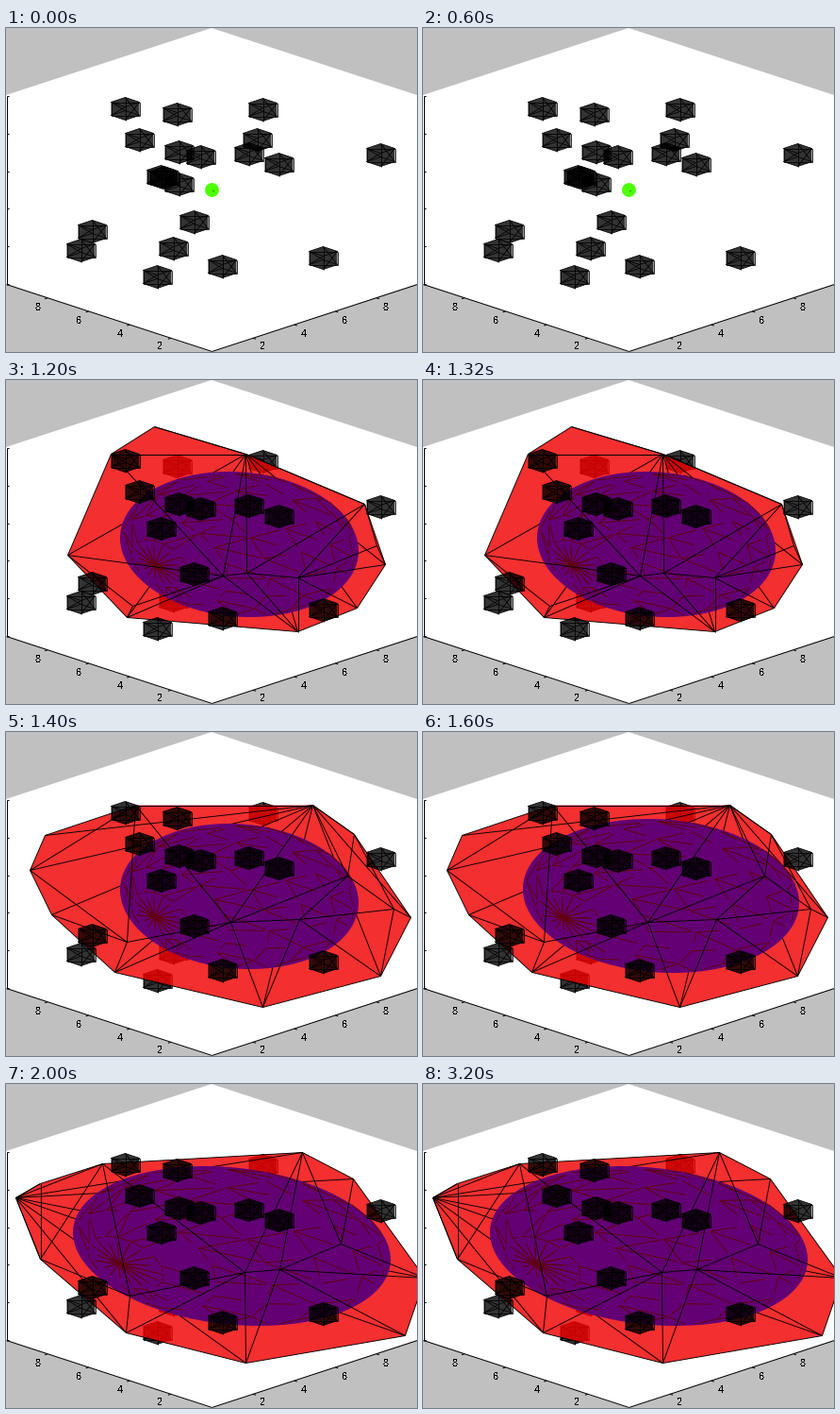
A matplotlib script for the animation above (4000 ms loop, 436 by 343 pixels).

```python
import numpy as np
import matplotlib.pyplot as plt
from matplotlib.animation import FuncAnimation
from matplotlib.collections import LineCollection
from matplotlib.patches import Circle, Polygon
from matplotlib.tri import Triangulation

W, H, DPI = 436, 343, 100
STEP, LOOP = 200, 4000
PX = 72 / DPI

plt.rcParams.update({
    "font.family": "Liberation Sans",
    "text.antialiased": False,
    "text.hinting": "native",
    "text.hinting_factor": 1,
})


def rgb(r, g, b):
    return r / 255, g / 255, b / 255


GREY = rgb(192, 192, 192)
RED = rgb(241, 0, 0)
PURPLE = rgb(99, 0, 116)
MAROON = rgb(98, 0, 18)
GREEN = rgb(76, 255, 0)
OLIVE = rgb(120, 112, 0)

fig = plt.figure(figsize=(W / DPI, H / DPI), dpi=DPI, facecolor=GREY)
ax = fig.add_axes([0, 0, 1, 1])
ax.set(xlim=(0, W), ylim=(H, 0))
ax.axis("off")


def shape(pts, color, z, alpha=1):
    return ax.add_patch(Polygon(pts, fc=color, ec="none", lw=0, alpha=alpha,
                                zorder=z))


def lines(segs, z, color="black", width=0.9):
    segs = np.asarray(segs, float) + 0.5
    return ax.add_collection(LineCollection(
        segs, colors=[color], linewidths=width * PX, zorder=z))


def show(parts, on):
    for part in parts:
        part.set_visible(on)


def draw_room():
    mid = W / 2
    shape([(0, 71), (mid, 0), (W, 71), (W, 271), (mid, H), (0, 271)],
          "white", 0)
    segs = [[(0, 271), (218, 342)], [(218, 342), (436, 271)],
            [(0, 71), (0, 271)]]
    segs += [[(0, y), (2, y)] for y in np.linspace(71, 270, 6).round()]
    for n in range(2, 10, 2):
        dx, y = 21.8 * n, 342 - 7.1 * n
        for side in (-1, 1):
            x = mid + side * dx
            segs.append([(x, y), (x + 3 * side, y + 1)])
            ax.text(mid + side * (10.8 + 21.7 * n), 350 - 6.85 * n, str(n),
                    size=11 * PX, ha="center", va="center_baseline", zorder=1)
    lines(segs, 1, width=1)


class Cube:
    """Translucent triangulated box; `under` lists the hulls covering it."""

    def __init__(self, x, y, under):
        lower = np.array([(0, 12), (15, 7), (0, 2), (-15, 7)])
        upper = lower - (0, 14)
        segs = []
        for i in range(4):
            j = (i + 1) % 4
            segs += [(lower[i], lower[j]), (upper[i], upper[j]),
                     (lower[i], upper[i]), (lower[i], upper[j])]
        segs += [(face[1], face[3]) for face in (lower, upper)]
        rim = [*lower[[3, 0, 1]], *upper[1:]]
        self.under = under
        self.parts = [shape(np.add(rim, (x + 0.5, y + 0.5)), "black", 2, 0.8),
                      lines(np.add(segs, (x, y)), 2, width=0.8)]

    def place(self, hull):
        for part in self.parts:
            part.set_zorder(2 if hull in self.under else 7)


def hull(rim, inner, hub):
    """Solid seen from the front: mesh before, fan of edges from hub behind."""
    rim = np.array(rim)
    pts = np.vstack([rim, inner])
    # a squeezed x axis favours the long, flat facets
    mesh = pts[Triangulation(0.6 * pts[:, 0], pts[:, 1]).edges]
    fan = [(rim[hub], p) for p in rim]
    return [shape(rim + 0.5, RED, 3, 0.815), lines(fan, 4), lines(mesh, 6)]


def sphere_mesh(rng, rings=9, spokes=18):
    """Broken edges on the near half of a unit sphere with a tilted pole."""
    pole = np.array([-0.71, 0.35, 0.61])
    u = np.cross(pole, [0, 1, 0])
    u /= np.linalg.norm(u)
    v = np.cross(pole, u)

    def node(i, j):
        a, b = np.pi * i / rings, 2 * np.pi * j / spokes
        return np.cos(a) * pole + np.sin(a) * (np.cos(b) * u + np.sin(b) * v)

    segs = []
    for i in range(rings):
        for j in range(spokes):
            p = node(i, j)
            for q in (node(i + 1, j), node(i, j + 1), node(i + 1, j + 1)):
                keep, part = rng.random() < 0.75, rng.uniform(0.5, 1)
                if (keep or i == 0) and min(p[2], q[2]) > 0:
                    segs.append((p, p + part * (q - p)))
    return np.array(segs)


def ellipsoid(cx, cy, rx, ry, skew):
    def project(p):
        x, y = p[..., 0], p[..., 1]
        return np.stack([cx + rx * x, cy + ry * (
            y * np.cos(skew) + x * np.sin(skew))], -1)

    t = np.linspace(0, 2 * np.pi, 160)
    rim = project(np.stack([np.cos(t), np.sin(t)], -1))
    mesh = project(sphere_mesh(np.random.default_rng(4)))
    return [shape(rim + 0.5, PURPLE, 5), lines(mesh, 5.5, MAROON, 1)]


draw_room()

near = [(126, 85), (141, 118), (183, 131), (206, 136), (257, 133), (289, 144),
        (397, 134), (164, 157), (199, 205), (91, 215), (79, 235), (229, 252),
        (336, 243)]
far = [(272, 86), (266, 118), (167, 158), (183, 165), (177, 233)]
cubes = [Cube(x, y, under) for under, spots in (
    ((), near), ((0, 1, 2), far), ((0,), [(181, 91)]), ((1, 2), [(160, 263)]))
    for x, y in spots]

hulls = [
    hull([(157, 49), (254, 78), (380, 131), (402, 195), (372, 241),
          (309, 266), (128, 251), (65, 185), (111, 78)],
         [(255, 204), (230, 207), (309, 209), (134, 239), (393, 175)], hub=1),
    hull([(41, 109), (137, 77), (325, 77), (369, 108), (429, 196),
          (397, 258), (272, 291), (115, 254), (48, 193), (25, 146)],
         [(311, 198), (238, 201), (362, 152), (411, 187), (128, 222)], hub=2),
    hull([(10, 120), (36, 105), (102, 84), (314, 72), (368, 100),
          (444, 205), (423, 266), (254, 295), (127, 263), (36, 185)],
         [(253, 199), (290, 196), (355, 169), (131, 224)], hub=0),
]

balls = [ellipsoid(247, 173.5, 126.5, 77, 0.09),
         ellipsoid(252, 173, 146.5, 81.5, 0.09),
         ellipsoid(239, 171, 168.5, 84.5, 0.17)]

dot = ax.add_patch(Circle((218.5, 171.5), 7.4, ec="none", lw=0, zorder=4.5))
lines([[(218, 171), (219, 171)]], 4.6)


def stage(t, first):
    """Index of the current solid; a new one comes every two steps."""
    return min((t - first) // (2 * STEP), 2) if t >= first else -1


def update(n):
    t = n * STEP
    h, b = stage(t, 1000), stage(t, 1200)
    for i in range(3):
        show(hulls[i], i == h)
        show(balls[i], i == b)
    for cube in cubes:
        cube.place(h)
    dot.set_facecolor(GREEN if h < 0 else OLIVE)
    return []


anim = FuncAnimation(fig, update, frames=LOOP // STEP, interval=STEP,
                     init_func=lambda: update(0), repeat=True, repeat_delay=0)
plt.show()
```
